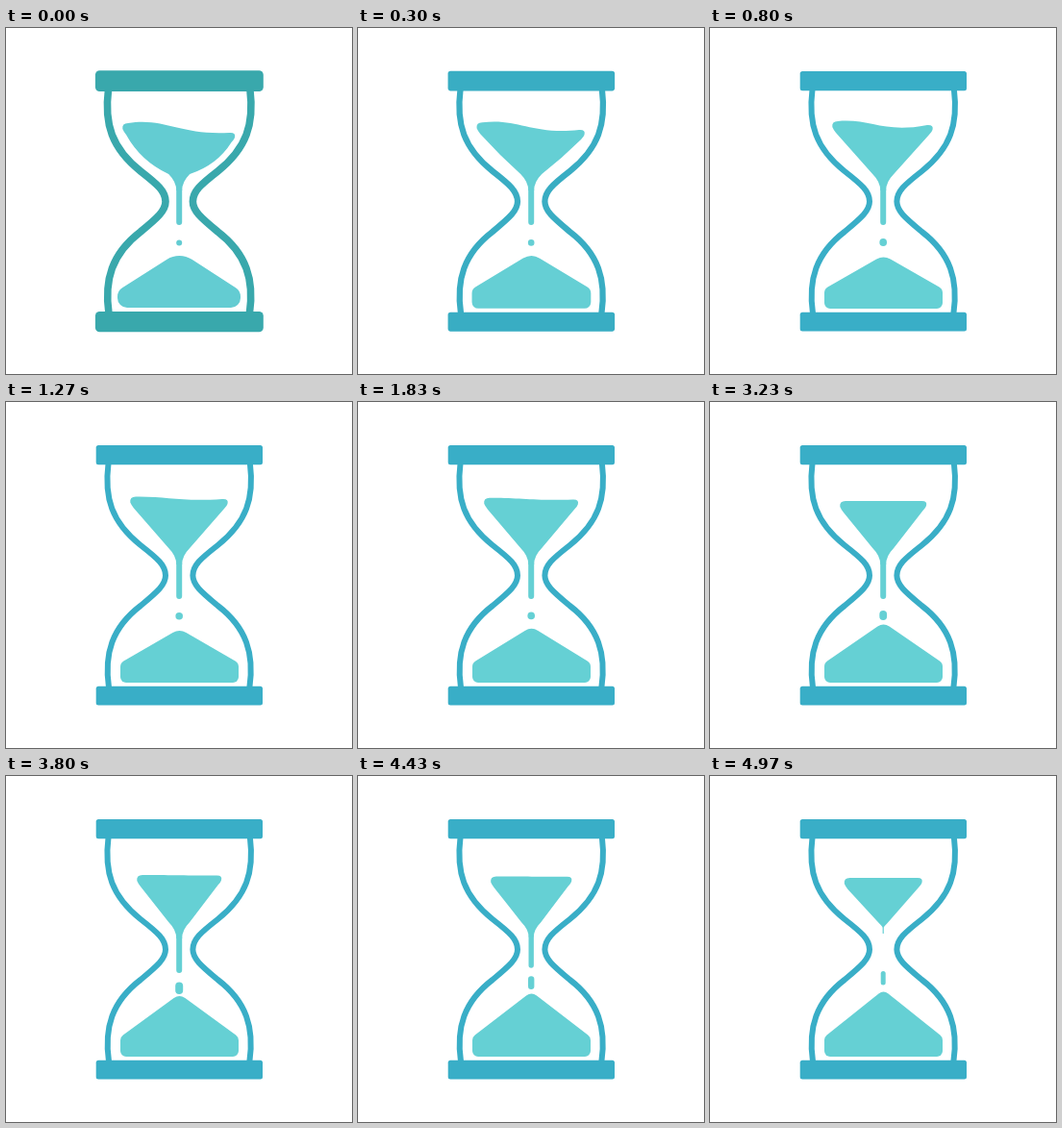
Animation, 360 px wide and 360 px high, one loop 5000 ms. Source, as an HTML page with a canvas:

```html
<!DOCTYPE html>
<html lang="en">
<head>
<meta charset="utf-8">
<title>Hourglass</title>
<style>
html, body { margin: 0; width: 100%; height: 100%; overflow: hidden; background: #fff; }
canvas { display: block; width: 360px; height: 360px; }
</style>
</head>
<body>
<canvas id="stage" width="360" height="360"></canvas>
<script>
const ctx = document.getElementById('stage').getContext('2d');
const LOOP = 5000;
const MID = 180.2;
const TIMES = [0, 800, 1270, 2430, 3230, 3800, 4970];
const KEYS = {
  left: [121, 127, 129, 133, 135, 136, 139.5],
  right: [238.5, 232, 231, 227.5, 225.5, 224.5, 221],
  topL: [99, 97, 98.5, 101, 103, 103, 106],
  waveL: [93, 94, 98, 101, 103, 103, 106],
  waveR: [112, 110, 104, 101.5, 103, 103.5, 106],
  topR: [109, 101, 101, 102, 103, 103.5, 106],
  peak: [236, 239, 238.5, 234, 232, 229.5, 225],
  dropTop: [220.5, 219, 219, 218, 217, 214.5, 203],
  dropEnd: [226.5, 227, 226.5, 226, 227, 227, 217.5],
  dropW: [3, 3.8, 3.8, 3.8, 3.9, 4, 2.5]
};

const lerp = (a, b, p) => a + (b - a) * p;
const clamp = p => Math.min(1, Math.max(0, p));
const mix = (a, b, p) => 'rgb(' + a.map((v, i) => Math.round(lerp(v, b[i], p))).join(',') + ')';

function pose(t) {
  let i = 0;
  while (i < TIMES.length - 2 && t >= TIMES[i + 1]) i++;
  const p = clamp((t - TIMES[i]) / (TIMES[i + 1] - TIMES[i]));
  const out = {};
  for (const k in KEYS) out[k] = lerp(KEYS[k][i], KEYS[k][i + 1], p);
  return out;
}

function bar(x, y, w, h, r) {
  ctx.beginPath();
  ctx.roundRect(x, y, w, h, r);
  ctx.fill();
}

function glassSide() {
  ctx.beginPath();
  ctx.moveTo(106.5, 64);
  ctx.bezierCurveTo(102, 100, 110, 125, 140, 149);
  ctx.bezierCurveTo(158, 163, 166, 170, 166, 180.5);
  ctx.bezierCurveTo(166, 190, 158, 197, 140, 212);
  ctx.bezierCurveTo(110, 235, 102, 262, 107, 297);
  ctx.stroke();
}

function frame(intro) {
  const color = mix([57, 174, 199], [57, 168, 172], intro);
  ctx.fillStyle = ctx.strokeStyle = color;
  ctx.lineWidth = lerp(6, 7.6, intro);
  glassSide();
  ctx.save();
  ctx.translate(2 * MID, 0);
  ctx.scale(-1, 1);
  glassSide();
  ctx.restore();
  const g = intro * 0.8, r = 2.5 + intro * 2;
  bar(93.7 - g, 45 - g, 173.3 + 2 * g, 20.3 + 2 * g, r);
  bar(93.7 - g, 295.8 - g, 173.3 + 2 * g, 19.7 + 2 * g, r);
}

function upperSand(s, intro, late) {
  const half = lerp(3, 0.6, late);
  const fx = lerp(11, 4, late), fy = lerp(152, 153.5, late);
  const cy = lerp(160, 157, late), end = lerp(169, 157.5, late);
  const bulge = 7 * intro;
  const l = s.left, r = s.right;
  ctx.beginPath();
  ctx.moveTo(l + 6, s.topL);
  ctx.bezierCurveTo(lerp(l, r, 0.38), s.waveL, lerp(l, r, 0.51), s.waveR, r - 6, s.topR);
  ctx.quadraticCurveTo(r + 1, s.topR - 0.5, r - 0.5, s.topR + 5);
  ctx.quadraticCurveTo(r - 1, s.topR + 7, r - 4, s.topR + 10);
  ctx.quadraticCurveTo((r - 4 + MID + fx) / 2 + bulge, (s.topR + 10 + fy) / 2 + bulge, MID + fx, fy);
  ctx.quadraticCurveTo(MID + half, cy, MID + half, end);
  ctx.lineTo(MID - half, end);
  ctx.quadraticCurveTo(MID - half, cy, MID - fx, fy);
  ctx.quadraticCurveTo((l + 4 + MID - fx) / 2 - bulge, (s.topL + 12 + fy) / 2 + bulge, l + 4, s.topL + 12);
  ctx.quadraticCurveTo(l + 1, s.topL + 8, l + 0.3, s.topL + 6);
  ctx.quadraticCurveTo(l - 0.5, s.topL, l + 6, s.topL);
  ctx.fill();
  const bottom = lerp(205, 164, late);
  bar(MID - half, end - 1, 2 * half, bottom - end + 1, [0, 0, half, half]);
}

function pile(s, intro, t) {
  const l = 119 - 3 * intro, r = 242 + 2 * intro;
  const base = 292 - intro, shoulder = 271.5 + intro * 2;
  const tip = s.peak - 2.6 - intro;
  const round = lerp(16, 8, t / LOOP) + 8 * intro;
  const soft = 6 + 4 * intro;
  ctx.beginPath();
  ctx.moveTo(MID, base);
  ctx.arcTo(l, base, l, shoulder, soft);
  ctx.arcTo(l, shoulder, MID, tip, soft + 1);
  ctx.arcTo(MID + 0.3, tip, r, shoulder, round);
  ctx.arcTo(r, shoulder, r, base, soft + 1);
  ctx.arcTo(r, base, MID, base, soft);
  ctx.closePath();
  ctx.fill();
}

function draw(t) {
  const s = pose(t);
  const intro = Math.pow(1 - clamp(t / 500), 2);
  const late = clamp((t - 4350) / 620);
  ctx.fillStyle = '#fff';
  ctx.fillRect(0, 0, 360, 360);
  frame(intro);
  ctx.fillStyle = mix([101, 208, 212], [99, 204, 210], intro);
  upperSand(s, intro, late);
  bar(MID - s.dropW, s.dropTop, 2 * s.dropW, s.dropEnd - s.dropTop, s.dropW);
  pile(s, intro, t);
}

const start = performance.now();
function tick(now) {
  draw(Math.max(0, now - start) % LOOP);
  requestAnimationFrame(tick);
}
draw(0);
requestAnimationFrame(tick);
</script>
</body>
</html>
```
